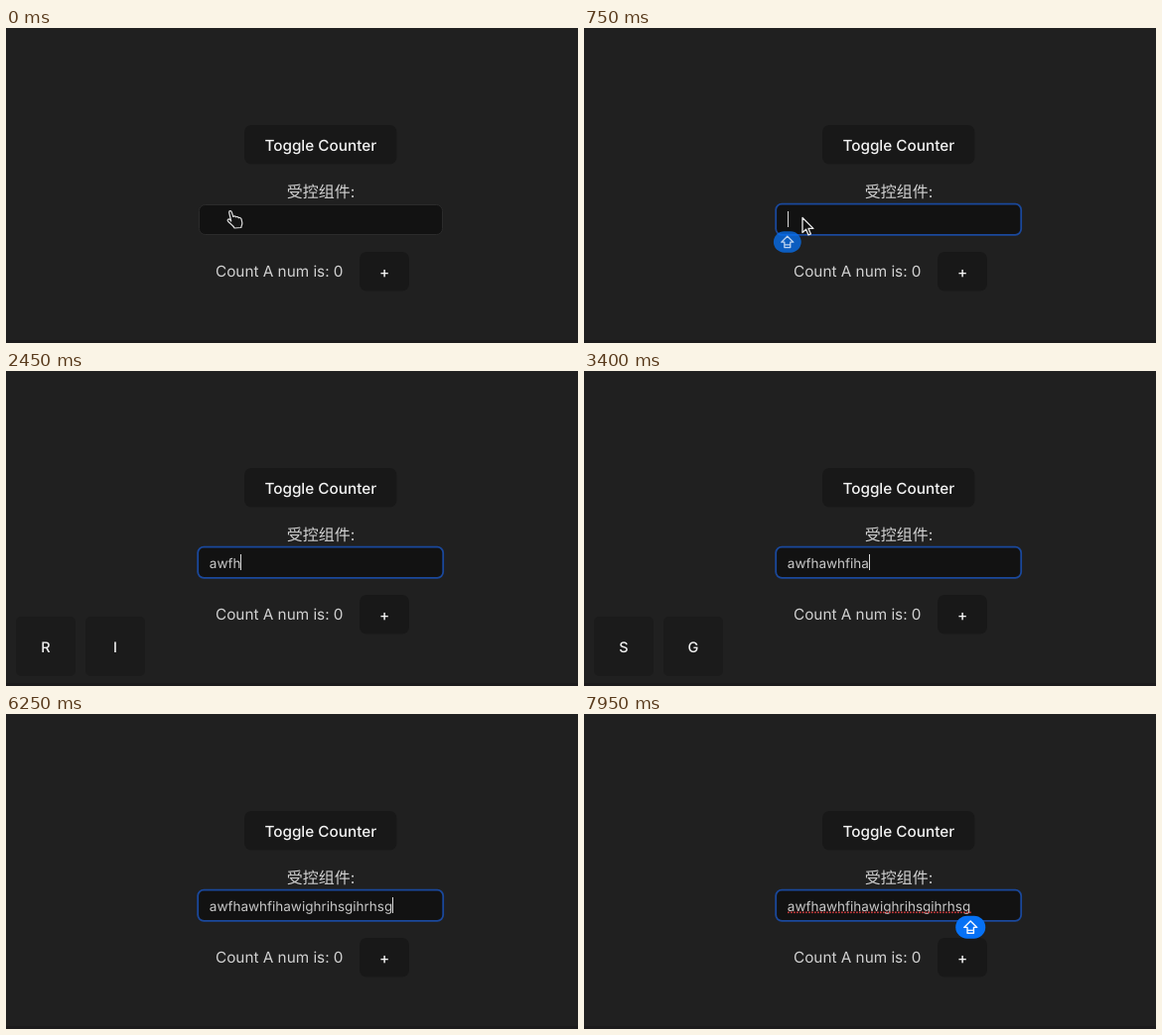
An HTML page with a canvas for the animation above (8 s loop, 576 by 318 pixels).

```html
<!DOCTYPE html>
<html lang="zh-CN">
<head>
<meta charset="utf-8">
<style>
  html, body { margin: 0; width: 100%; height: 100%; overflow: hidden; background: #202020; }
  canvas { display: block; }
</style>
</head>
<body>
<canvas id="stage" width="576" height="318"></canvas>
<script>
const ctx = document.getElementById('stage').getContext('2d');
ctx.textRendering = 'geometricPrecision';

const LOOP = 8000;
const TYPED = 'awfhawhfihawighrihsgihrhsg';
const SANS = 'Inter, "Noto Sans CJK SC", "Noto Sans CJK", sans-serif';
const FOCUS_AT = 400, TYPING_AT = 950, SETTLED_AT = 6250;

// [time, characters shown]: the field lags behind the keyboard
const REVEALS = [
  [1700, 1], [1900, 2], [2100, 3], [2300, 4], [2500, 5], [2750, 6], [3000, 7],
  [3200, 10], [3400, 11], [3600, 12], [3750, 13], [4100, 14], [4400, 16],
  [4800, 18], [5000, 19], [5700, 23], [5900, 24], [6250, 26]
];

const ARROW = new Path2D('M0 0V15L3.6 11.8L6 17.4L8.4 16.4L6 10.9H10.9Z');
const HAND = new Path2D('M4.2 11L2.2 2.5C1.8 .3 4.2-.2 4.8 1.8L6.3 6.5C7.2 5.4 8.6 5.8 9 6.9C10 6.1 11.4 6.6 11.8 7.7C13 7.1 14.3 7.7 14.6 9.2L15.3 12.5C15.6 14.5 14.5 15.5 14.3 17.5L7.6 18C6.2 15.2 3 13.6 1 11.2C-.2 9.4 1.7 8.2 3 9.5Z');
const CAPS = new Path2D('M0-6.2L6.5 .2H3.2V3.2H-3.2V.2H-6.5ZM-3.2 3.2V6H3.2V3.2');

const clamp = v => Math.max(0, Math.min(1, v));
const ramp = (t, from, to) => clamp((t - from) / (to - from));
const easeOut = p => 1 - (1 - p) ** 3;

function box(x, y, w, h, r, fill, stroke, lineWidth = 1) {
  ctx.beginPath();
  ctx.roundRect(x, y, w, h, r);
  ctx.fillStyle = fill;
  ctx.fill();
  if (stroke) {
    ctx.strokeStyle = stroke;
    ctx.lineWidth = lineWidth;
    ctx.stroke();
  }
}

function text(str, x, y, size, { weight = 400, color = '#d2d2d2', align = 'left' } = {}) {
  ctx.font = `${weight} ${size}px ${SANS}`;
  ctx.fillStyle = color;
  ctx.textAlign = align;
  ctx.fillText(str, x, y);
}

function icon(path, x, y, fill, stroke, lineWidth) {
  ctx.save();
  ctx.translate(x, y);
  ctx.lineJoin = 'round';
  ctx.lineWidth = lineWidth;
  ctx.strokeStyle = stroke;
  if (fill) {
    ctx.fillStyle = fill;
    ctx.fill(path);
  }
  ctx.stroke(path);
  ctx.restore();
}

function button(label, x, y, w, h) {
  box(x, y, w, h, 7, '#181818');
  text(label, x + w / 2, y + h / 2 + 5.8, 15.3, { weight: 500, color: '#f4f4f4', align: 'center' });
}

function drawField(t) {
  const focused = t >= FOCUS_AT;
  if (focused) box(193.2, 177.6, 247, 31.2, 6, '#121212', '#1a489c', 1.8);
  else box(194.5, 178.5, 245, 30, 6, '#121212', '#2b2b2b');

  const reveal = REVEALS.findLast(([at]) => t >= at);
  const shown = TYPED.slice(0, reveal ? reveal[1] : 0);
  text(shown, 204.8, 198.5, 13.5, { color: '#c8c8c8' });
  const end = 204.8 + ctx.measureText(shown).width;

  if (t >= 7250) {
    ctx.fillStyle = '#c0393b';
    for (let x = 205; x < end - 1; x += 3) ctx.fillRect(x, 199.5, 1.8, 1.6);
  }

  const blinkOn = Math.floor((t - SETTLED_AT) / 500) % 2 === 0;
  const caretOn = shown ? t < SETTLED_AT || blinkOn : focused && t < 900;
  if (caretOn) {
    ctx.fillStyle = '#d8d8d8';
    ctx.fillRect(Math.floor(end + 0.3), 185, 1, 16);
  }
  return end;
}

function drawBadge(x, y, p) {
  if (p <= 0) return;
  ctx.save();
  ctx.globalAlpha = p;
  ctx.translate(x, y);
  ctx.scale(0.7 + 0.3 * p, 0.7 + 0.3 * p);
  box(-15, -11.5, 30, 23, 11.5, '#0671f5');
  icon(CAPS, 0, 0, null, '#f4f8ff', 1.4);
  ctx.restore();
}

const keyTime = i => i < 6 ? TYPING_AT + 125 * i : 1750 + 68 * (i - 6);

// Pressed keys fill three slots, then the row starts afresh
function drawKeys(t) {
  const pressed = [...TYPED].filter((_, i) => t >= keyTime(i)).length;
  if (!pressed) return;
  const first = Math.floor((pressed - 1) / 3) * 3;
  ctx.save();
  ctx.globalAlpha = 1 - ramp(t, 3900, 4250);
  for (let i = first; i < pressed; i++) {
    const x = 10 + 70 * (i - first);
    box(x, 248, 60, 60, 5, '#1b1b1b');
    text(TYPED[i].toUpperCase(), x + 30, 283.8, 14.5, { weight: 500, color: '#f2f2f2', align: 'center' });
  }
  ctx.restore();
}

function drawPointer(t) {
  if (t >= TYPING_AT) return;
  const p = easeOut(ramp(t, 50, 400));
  if (t < 150) icon(HAND, 222.5 - 8 * p, 184 + 7 * p, '#161616', '#dedede', 1.2);
  else icon(ARROW, 227 - 7 * p, 185 + 6.5 * p, '#111', '#e8e8e8', 1.3);
}

function draw(t) {
  ctx.fillStyle = '#202020';
  ctx.fillRect(0, 0, 576, 318);
  ctx.fillStyle = '#1c1b1c';
  ctx.fillRect(0, 315, 576, 3);

  button('Toggle Counter', 240, 98, 153.5, 39.5);
  text('受控组件:', 317, 171, 16, { align: 'center' });
  const caretX = drawField(t);
  text('Count A num is: 0', 211, 251.3, 15.3);
  button('+', 356, 226, 50, 39.5);

  drawKeys(t);
  if (t < TYPING_AT) drawBadge(caretX, 216, ramp(t, 600, 800));
  else drawBadge(caretX, 215.2, ramp(t, 6600, 6750));
  drawPointer(t);
}

function tick() {
  draw(performance.now() % LOOP);
  requestAnimationFrame(tick);
}
tick();
</script>
</body>
</html>
```
